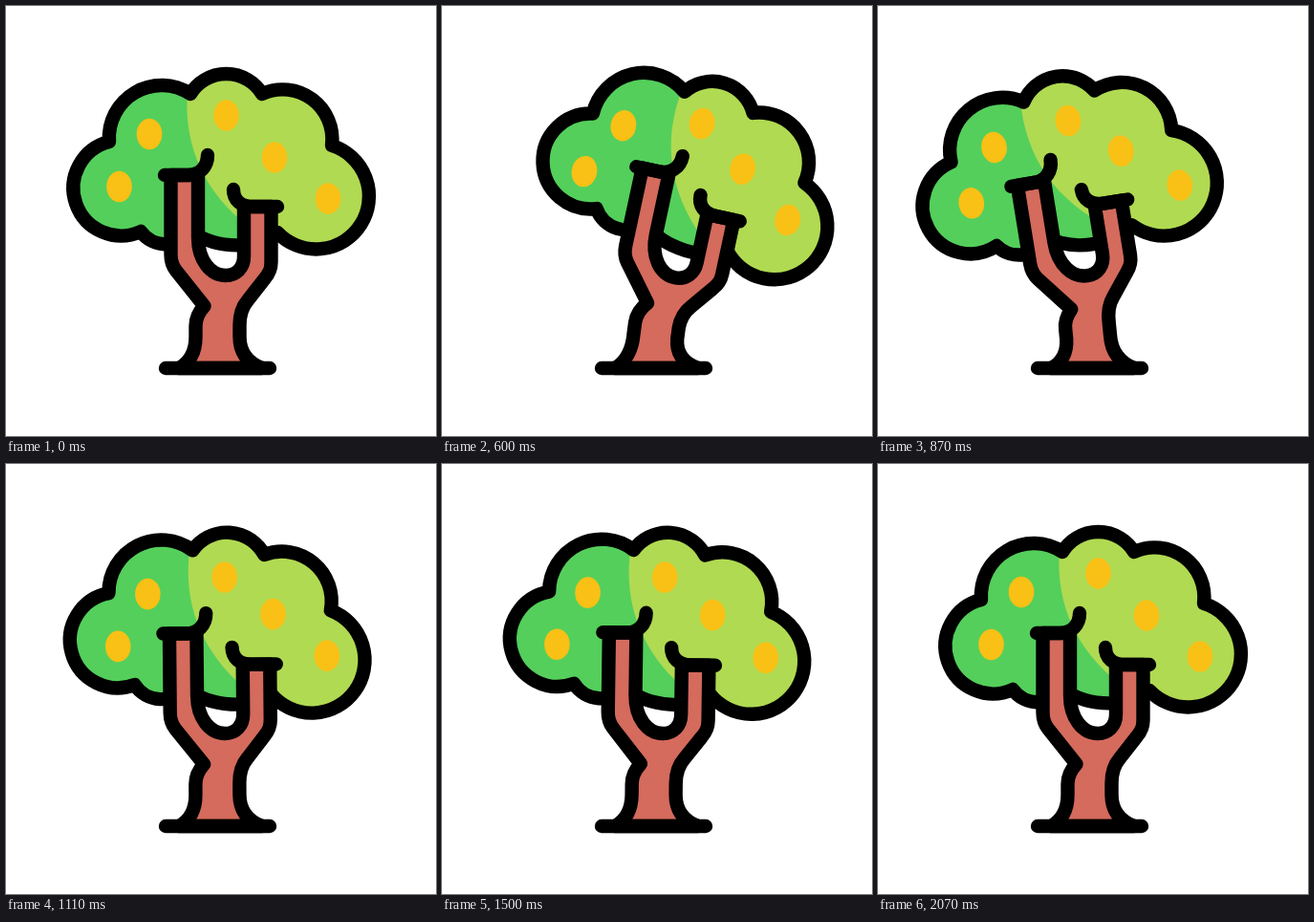
These frames come from a looping animation (450x450 px, 2250 ms). An HTML page with a canvas:

```html
<!DOCTYPE html>
<html lang="en">
<head>
<meta charset="utf-8">
<title>Tree in the wind</title>
<style>
  html, body { margin: 0; width: 100%; height: 100%; overflow: hidden; background: #fff; }
  canvas { display: block; width: 450px; height: 450px; }
</style>
</head>
<body>
<canvas id="stage" width="450" height="450"></canvas>
<script>
const canvas = document.getElementById('stage');
const ctx = canvas.getContext('2d');
const dpr = window.devicePixelRatio || 1;
canvas.width = canvas.height = 450 * dpr;

const LOOP = 2250, STEP = 30, RAD = Math.PI / 180;
const ROOT = { x: 226, y: 379, bendHeight: 62 };
const CROWN = { x: 222, y: 158 };

// Turning points of the sway, in ms and degrees
const sway = [[150, 0], [540, 14], [870, -9.2], [1290, 5], [1728, -4], [2070, 0]];
// How much further the crown turns than the trunk
const crownLag = [[150, 0], [360, 2.5], [600, 5], [870, 0], [1110, 4], [1500, 3.4], [2070, 0]];
const fruitSag = [[150, 0], [360, 0.7], [600, 1], [1700, 1], [2070, 0]];

const cloud = new Path2D('M108,142 A55,55 0 0 1 193,92 A44,44 0 0 1 268,92 ' +
  'A52,52 0 0 1 341,146 A55.5,55.5 0 1 1 284,237 C266,254 222,256 194,236 ' +
  'C182,254 154,254 141,236 A50,50 0 1 1 108,142 Z');
const litSide = new Path2D('M190,88 C185,150 210,200 262,237 L300,290 L420,290 L420,40 L190,40 Z');

// x, y, extra drop while swaying
const fruits = [[150, 134, 1.5], [118.5, 189, 1], [230.5, 114.5, 4], [281, 158.5, -1], [337, 201.5, 0]];

const trunkLeft = 'M172.5,177 L172.5,260 C172.5,268 174,272 178,277 L207.5,314 ' +
  'C201,321 198.5,327 198.5,335 L198.5,346 C198.5,362 192,373 181,379';
const trunkRight = 'L268,379 C252,373 244.5,362 244.5,346 L244.5,334 C244.5,323 247,315 253,308 ' +
  'L271,285 C276,279 277.5,275 277.5,268 L277.5,210';
const fork = 'L249,210 L249,262 C249,274 241,282 230,282 C214,282 201,266 201,242 L201,177';
const trunk = trunkLeft + trunkRight + fork + 'Z';
const twigs = 'M166,177 L190,177 C203,177 211,168 211,156 M238,192 C238,203 246,210 258,210 L284,210';
const ground = 'M167,379 L276,379';

const gusts = [
  { path: new Path2D('M13,76 L92,76 A28.5,28.5 0 0 0 93,19'), len: 169, start: 120 },
  { path: new Path2D('M13,102 L113,102'), len: 100, start: 158 },
  { path: new Path2D('M13,134 L92,134 A28.5,28.5 0 0 1 92,191'), len: 169, start: 100 }
];

const clamp = v => Math.max(0, Math.min(1, v));

function track(keys, t) {
  if (t <= keys[0][0]) return keys[0][1];
  for (let i = 1; i < keys.length; i++) {
    const [t0, a] = keys[i - 1], [t1, b] = keys[i];
    if (t < t1) return a + (b - a) * (1 - Math.cos(Math.PI * (t - t0) / (t1 - t0))) / 2;
  }
  return keys[keys.length - 1][1];
}

// The turn grows along the lower trunk and stays constant above it
function bend(d, angle) {
  return new Path2D(d.replace(/([\d.]+),([\d.]+)/g, (m, px, py) => {
    const h = Math.max(0, Math.min(ROOT.bendHeight, ROOT.y - py));
    const a = angle * h / ROOT.bendHeight, c = Math.cos(a), s = Math.sin(a);
    const cy = ROOT.y - h / 2, x = px - ROOT.x, y = py - cy;
    return (ROOT.x + c * x - s * y).toFixed(2) + ',' + (cy + s * x + c * y).toFixed(2);
  }));
}

function turn(angle, x, y) {
  ctx.translate(x, y);
  ctx.rotate(angle);
  ctx.translate(-x, -y);
}

function drawCrown(angle, lag) {
  ctx.save();
  turn(angle, ROOT.x, ROOT.y - ROOT.bendHeight / 2);
  turn(lag, CROWN.x, CROWN.y);
  ctx.fillStyle = '#54cf5b';
  ctx.fill(cloud);
  ctx.save();
  ctx.clip(cloud);
  ctx.fillStyle = '#b0da52';
  ctx.fill(litSide);
  ctx.restore();
  ctx.stroke(cloud);
  ctx.restore();
}

function drawFruits(angle, sag) {
  ctx.save();
  turn(angle, ROOT.x, ROOT.y - ROOT.bendHeight / 2);
  ctx.fillStyle = '#f9c015';
  for (const [x, y, drop] of fruits) {
    ctx.beginPath();
    ctx.ellipse(x, y + drop * sag, 13.3, 16.3, 0, 0, 2 * Math.PI);
    ctx.fill();
  }
  ctx.restore();
}

function drawTrunk(angle) {
  const body = bend(trunk, angle);
  ctx.fillStyle = '#d46b5d';
  ctx.fill(body);
  ctx.stroke(body);
  ctx.stroke(bend(twigs, angle));
  ctx.stroke(bend(ground, angle));
}

function drawWind(t) {
  ctx.save();
  ctx.strokeStyle = '#65cad3';
  for (const { path, len, start } of gusts) {
    const head = len * clamp((t - start) / 170);
    const tail = len * clamp((t - start - 170) / 190);
    if (head - tail < 0.5) continue;
    ctx.setLineDash([head - tail, 1000]);
    ctx.lineDashOffset = -tail;
    ctx.stroke(path);
  }
  ctx.restore();
}

function draw(now) {
  const t = Math.floor((now % LOOP) / STEP) * STEP;
  const angle = track(sway, t) * RAD;
  ctx.setTransform(dpr, 0, 0, dpr, 0, 0);
  ctx.fillStyle = '#fff';
  ctx.fillRect(0, 0, 450, 450);
  ctx.lineWidth = 14.4;
  ctx.lineCap = ctx.lineJoin = 'round';
  ctx.strokeStyle = '#000';
  drawCrown(angle, track(crownLag, t) * RAD);
  drawFruits(angle * 0.86, track(fruitSag, t));
  drawTrunk(angle);
  drawWind(t);
}

const begin = performance.now();
function tick() {
  draw(performance.now() - begin);
  requestAnimationFrame(tick);
}
tick();
</script>
</body>
</html>
```
